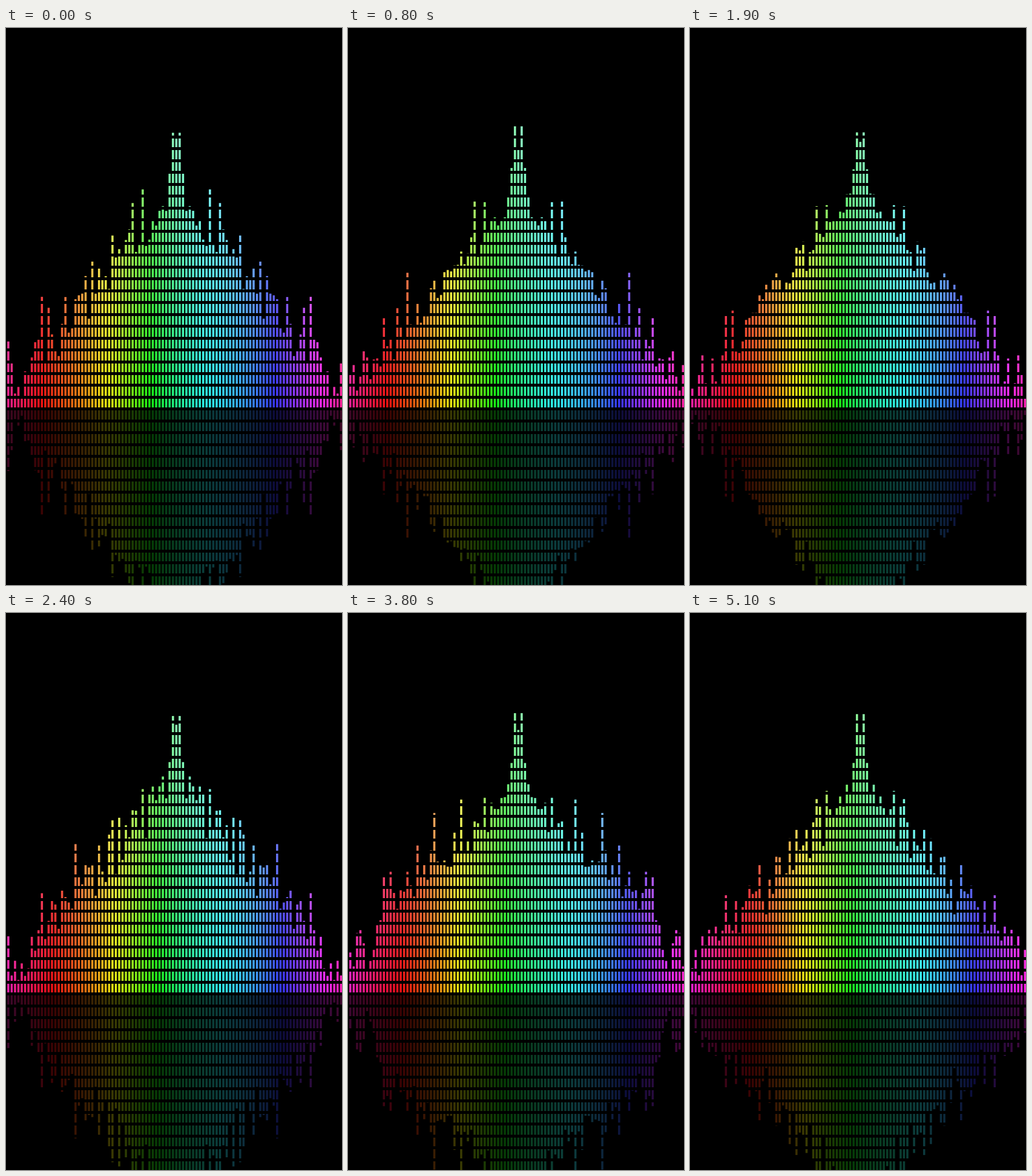
An HTML page with a canvas that plays this animation: 581 by 963 pixels, repeating every 5.2 s.

```html
<!DOCTYPE html>
<html lang="en">
<head>
<meta charset="utf-8">
<title>Spectrum</title>
<style>
  html, body { margin: 0; width: 100%; height: 100%; overflow: hidden; background: #000; }
  canvas { display: block; }
</style>
</head>
<body>
<canvas id="stage" width="581" height="963"></canvas>
<script>
const ctx = document.getElementById('stage').getContext('2d');
const W = 581, H = 963, LOOP = 5200, STEP = 100, BEAT = 300;
const BARS = 100, CENTRE = 50, PITCH = W / BARS, BAR_W = 3.7;
const FLOOR = 656.4, ROW = 20.46, GAP = 5, MIRROR = 1308;

// Outline of the mountain from edge to centre: [bar, top].
const outline = [[0, 600], [6, 590], [14, 530], [24, 462], [34, 402],
                 [42, 345], [47, 298], [48, 253], [49, 172], [50, 200]];
const loudBars = [10, 12, 17, 20, 25, 31, 33, 37, 40];

function noise(a, b) {
  const s = Math.sin(a * 127.1 + b * 311.7) * 43758.5453;
  return (s - Math.floor(s)) * 2 - 1;
}

function outlineTop(bar) {
  const k = Math.max(1, outline.findIndex(([b]) => b >= bar));
  const [b0, y0] = outline[k - 1], [b1, y1] = outline[k];
  return y0 + (y1 - y0) * (bar - b0) / (b1 - b0);
}

function flicker(bar, time) {
  const beat = Math.floor(time / BEAT), u = time / BEAT - beat;
  const ease = u * u * (3 - 2 * u);
  return noise(bar, beat) * (1 - ease) + noise(bar, beat + 1) * ease;
}

function barTop(bar, time) {
  const reach = bar > 47 ? 14 : 58 - 0.5 * bar;
  const lift = loudBars.includes(bar) ? 45 : 0;
  // The shoulders swell once per loop.
  const swell = 48 * Math.exp(-(((time - 3500) / 600) ** 2)) * Math.max(0, Math.sin(Math.PI * bar / 34));
  const y = outlineTop(bar) - lift - swell + reach * flicker(bar, time);
  return Math.min(651, Math.max(150, y));
}

function barColour(j, time) {
  const turn = 2 * Math.PI * j / BARS;
  const hue = 322 + 3.6 * j + 8 * Math.cos(2 * turn) - 20 * time / LOOP;
  return `hsl(${hue}, 88%, ${53 - 5 * Math.sin(turn)}%)`;
}

function eachBar(time, paint) {
  for (let j = 0; j < BARS; j++) {
    ctx.fillStyle = barColour(j, time);
    paint(4 + PITCH * j - BAR_W / 2, barTop(CENTRE - Math.abs(j - CENTRE), time));
  }
}

const glow = ctx.createLinearGradient(0, FLOOR, 0, 180);
glow.addColorStop(0, 'rgba(255,255,255,0)');
glow.addColorStop(1, 'rgba(255,255,255,0.5)');

function draw(time) {
  ctx.clearRect(0, 0, W, H);
  eachBar(time, (x, top) => ctx.fillRect(x, top, BAR_W, FLOOR - top));

  ctx.globalCompositeOperation = 'source-atop';
  ctx.fillStyle = glow;
  ctx.fillRect(0, 0, W, FLOOR);
  ctx.globalCompositeOperation = 'source-over';

  ctx.globalAlpha = 0.25;
  eachBar(time, (x, top) => ctx.fillRect(x, FLOOR, BAR_W, MIRROR - top - FLOOR));
  ctx.globalAlpha = 1;

  for (let row = -25; row <= 15; row++) {
    ctx.clearRect(0, Math.round(FLOOR + row * ROW), W, GAP);
  }
}

function frame() {
  const time = performance.now() % LOOP;
  draw(Math.floor(time / STEP) * STEP);
  requestAnimationFrame(frame);
}
frame();
</script>
</body>
</html>
```
